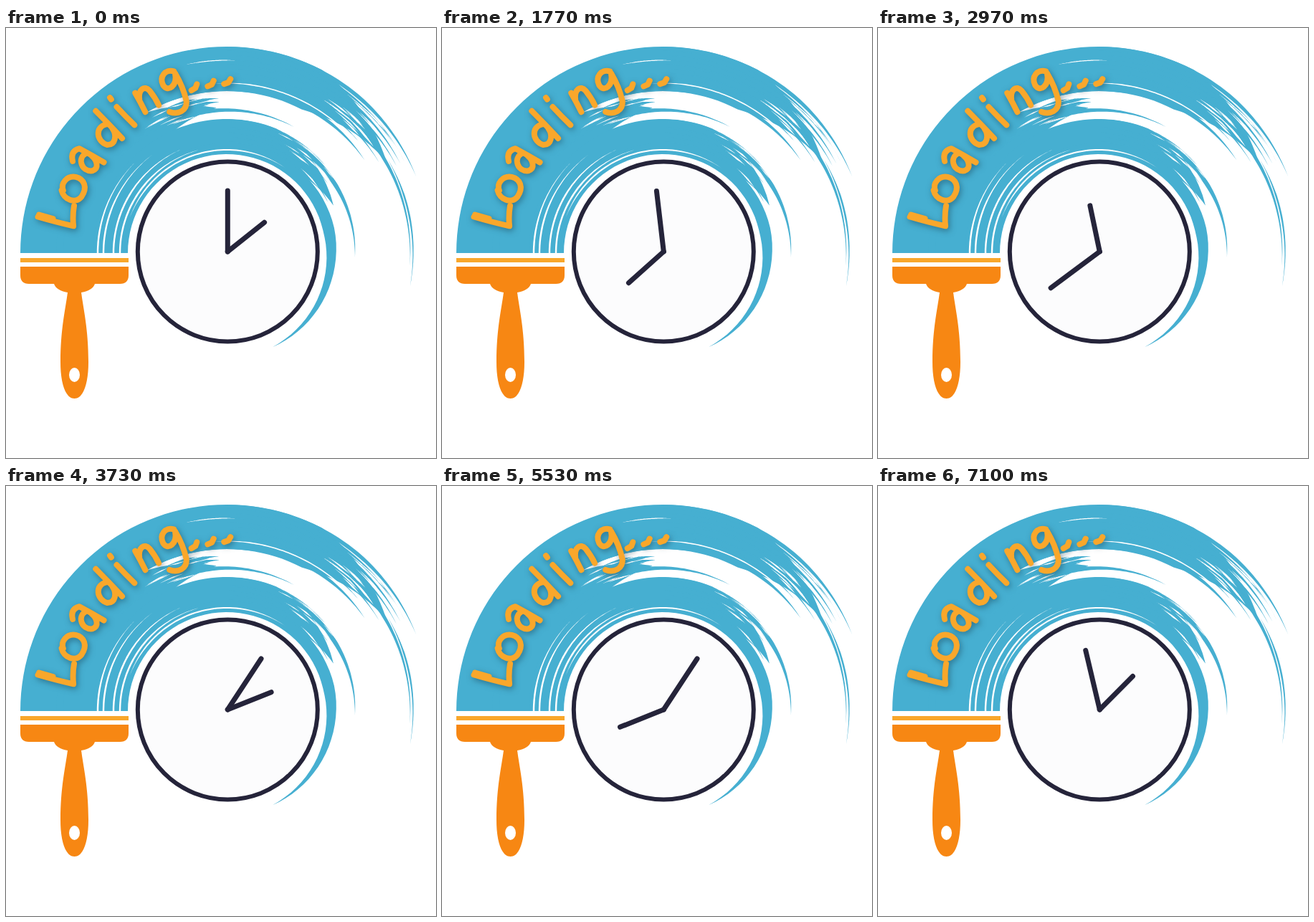
These frames come from a looping animation (600x600 px, 7130 ms). An HTML page:

```html
<!DOCTYPE html>
<html lang="en">
<head>
<meta charset="utf-8">
<title>Loading</title>
<style>
html, body { margin: 0; width: 100%; height: 100%; overflow: hidden; background: #fff; }
svg { display: block; width: 100vw; height: 100vh; }
#lettering { fill: none; stroke: #f9a72b; stroke-width: 8; stroke-linecap: round; stroke-linejoin: round;
  filter: drop-shadow(2px 3px 4px rgba(20, 60, 80, .5)); }
.clock { stroke: #25243a; stroke-linecap: round; }
</style>
</head>
<body>
<svg viewBox="0 0 600 600">
  <g id="paint"></g>
  <g id="lettering" role="img" aria-label="Loading..."></g>

  <rect x="20" y="321" width="151" height="6" fill="#f9a72b"/>
  <path fill="#f78713" d="M20 333H171V345Q171 357 159 357H124Q121 366 105 369C108 392 115 420 115 466C115 496 108 517 95.5 517C83 517 76 496 76 466C76 420 83 392 86 369Q70 366 67 357H32Q20 357 20 345Z"/>
  <ellipse cx="95.500" cy="484" rx="7.500" ry="10" fill="#fff"/>

  <g class="clock">
    <circle cx="309.300" cy="312" r="130" fill="#fff" stroke="none"/>
    <circle cx="309.300" cy="312" r="125.500" fill="#fcfcfd" stroke-width="6"/>
    <g transform="translate(309.300 312)" stroke-width="7">
      <path id="minute" d="M0 0V-85"/>
      <path id="hour" d="M0 0V-65.500"/>
    </g>
  </g>
</svg>
<script>
const BLUE = '#46afd1', WHITE = '#fff', CX = 308, CY = 314;
const $ = id => document.getElementById(id);

function addPath(parent, attributes) {
  const path = document.createElementNS('http://www.w3.org/2000/svg', 'path');
  for (const name in attributes) path.setAttribute(name, attributes[name]);
  $(parent).append(path);
}

let seed = 7;
function random(lo, hi) {
  seed = seed * 16807 % 2147483647;
  return lo + (hi - lo) * seed / 2147483647;
}

// Angles run clockwise in degrees from the left end of the sweep.
function polar(r, deg) {
  const a = deg * Math.PI / 180;
  return (CX - r * Math.cos(a)).toFixed(1) + ' ' + (CY - r * Math.sin(a)).toFixed(1);
}

// Arc of paint that thins out over `head` and `tail` degrees.
function streak(fill, r, width, from, to, tail, head = 0) {
  const outer = [], inner = [], steps = 60;
  for (let i = 0; i <= steps; i++) {
    const deg = from + (to - from) * i / steps;
    const thin = Math.min(1, (to - deg) / tail, head ? (deg - from) / head : 1);
    outer.push(polar(r + width / 2 * thin, deg));
    inner.unshift(polar(r - width / 2 * thin, deg));
  }
  addPath('paint', { fill, d: 'M' + outer.concat(inner).join('L') + 'Z' });
}

// Neighbouring bristles between two radii, with ends that vary a little.
function fray(count, r0, r1, end0, end1) {
  for (let i = 0; i < count; i++) {
    const k = i / (count - 1), end = end0 + (end1 - end0) * k + random(-4, 4);
    streak(BLUE, r0 + (r1 - r0) * k, (r1 - r0) / count, 90, end, 28);
  }
}

function scratches(count, color, a0, a1, r0, r1, length, width) {
  while (count--) {
    const a = random(a0, a1), size = random(length / 2, length);
    streak(color, random(r0, r1), random(width / 2, width), a, a + size, size * .4, size * .6);
  }
}

// Solid bands, outside to inside
streak(BLUE, 257, 62, 0, 150, 32);
streak(BLUE, 232, 12, 0, 146, 50);
streak(BLUE, 203, 50, 0, 86, 28);
streak(BLUE, 199.5, 6.5, 40, 118, 40, 30);
streak(BLUE, 163, 48, 0, 156, 44);
streak(BLUE, 146, 16, 0, 244, 76);

// Ragged ends and the long trailing hairs
fray(8, 241, 285, 144, 156);
fray(5, 158, 184, 152, 136);
streak(BLUE, 256, 8, 100, 184, 60);
streak(BLUE, 179, 7, 90, 182, 40);
streak(BLUE, 260, 2.5, 150, 191, 22, 12);
scratches(9, BLUE, 64, 76, 204, 225, 18, 4);

// Paper showing between bristles
for (const r of [180, 172, 158, 149]) streak(WHITE, r, 2.4, -1, 225 - r, 36);
streak(WHITE, 144, 2, 20, 125, 30, 20);
streak(WHITE, 237, 1.6, 86, 142, 12, 12);
streak(WHITE, 269, 1.2, 78, 93, 5, 5);
scratches(18, WHITE, 122, 144, 244, 282, 13, 2.6);
scratches(12, WHITE, 112, 140, 156, 184, 14, 2.2);
scratches(8, WHITE, 56, 68, 188, 224, 12, 1.8);

// Hand lettering: each glyph stands on a baseline that drifts outwards.
const DOT = 'M-5 1L1 -1L4 -6';
const glyphs = [
  [10, 'M4 -57Q1 -30 0 -6Q14 -10 28 -10M7 -56L5 -36'],
  [22.6, 'M-8 -31C-18 -24 -19 -6 -5 -2C10 1 19 -8 17 -20C14 -33 0 -36 -7 -29'],
  [34, 'M-14 -31Q-4 -42 6 -33Q8 -14 9 6M5 -22C-8 -28 -19 -12 -10 -1C-1 6 6 -4 7 -13'],
  [45, 'M11 -47Q11 -20 10 6M9 -23C-6 -33 -19 -16 -11 -2C-3 6 8 -2 10 -13'],
  [53.7, 'M-3 -46V-43M-3 -30Q-1 -12 2 5'],
  [60, 'M1 -30Q1 -14 0 0M1 -18C7 -33 18 -33 20 -23Q22 -10 21 1'],
  [72, 'M8 -33C-2 -40 -14 -32 -12 -19C-9 -7 7 -12 9 -30Q14 -8 12 12C9 25 -5 27 -15 19'],
  [79, DOT], [84.7, DOT], [90.3, DOT]
];
for (const [deg, d] of glyphs) {
  const baseline = 208 + .32 * deg;
  addPath('lettering', { d, transform: `translate(${CX} ${CY}) rotate(${deg - 90}) translate(0 ${-baseline})` });
}

const LOOP = 7130, FRAMES = 214, CYCLE = 107;
const start = performance.now();
function draw() {
  const t = (performance.now() - start) % LOOP;
  const frame = Math.min(FRAMES - 1, Math.floor((t + 4) * .03));
  const angle = frame % CYCLE * 20 / 3;
  $('minute').setAttribute('transform', `rotate(${angle})`);
  $('hour').setAttribute('transform', `rotate(${51.5 + angle / 2})`);
  requestAnimationFrame(draw);
}
draw();
</script>
</body>
</html>
```
